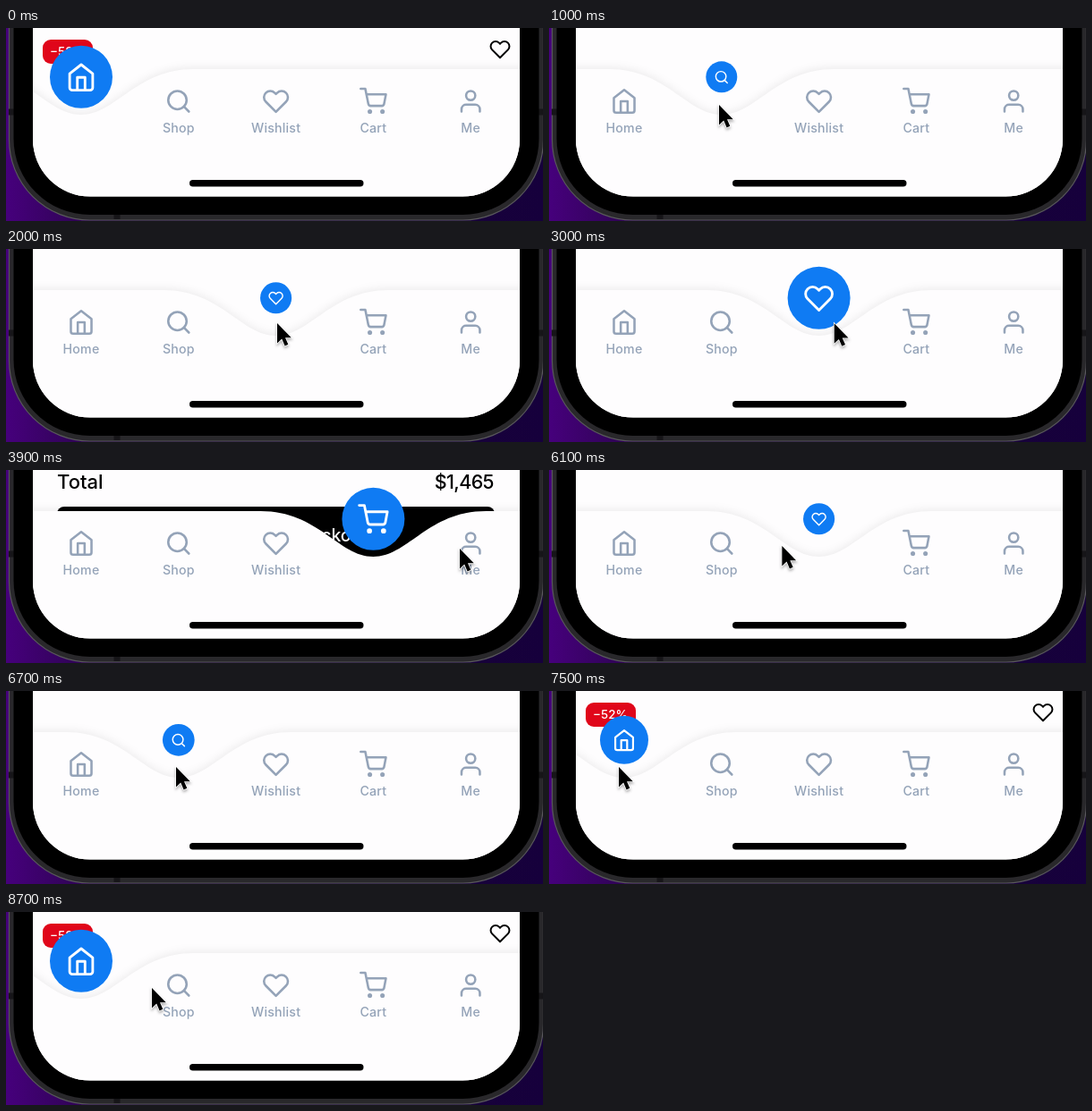
Write an HTML page that moves like this. It is 600x216 px and loops after 8.8 s.

```html
<!DOCTYPE html>
<html lang="en">
<head>
<meta charset="utf-8">
<title>Curved tab bar</title>
<style>
html, body { margin: 0; width: 100%; height: 100%; overflow: hidden; background: #000; }
svg { display: block; font-family: Inter, "Open Sans", sans-serif; font-weight: 500; }
.icon { fill: none; stroke: #94a3b8; stroke-width: 2; stroke-linecap: round; stroke-linejoin: round; }
.label { fill: #94a3b8; font-size: 14.2px; letter-spacing: .2px; text-anchor: middle; }
#bar { fill: #fefdfe; filter: drop-shadow(0 -2px 5px rgba(0, 0, 0, .07)); }
#cursor { filter: drop-shadow(0 2px 1.5px rgba(0, 0, 0, .3)); }
</style>
</head>
<body>
<svg width="600" height="216" viewBox="0 0 600 216">
  <defs>
    <linearGradient id="wall">
      <stop offset="0" stop-color="#46007c"/>
      <stop offset=".25" stop-color="#1d0636"/>
      <stop offset="1" stop-color="#16003c"/>
    </linearGradient>
    <clipPath id="screen"><rect x="30" y="-200" width="544" height="388.5" rx="64"/></clipPath>
    <g id="home"><path d="M3 9l9-7 9 7v11a2 2 0 0 1-2 2H5a2 2 0 0 1-2-2zM9 22V12h6v10"/></g>
    <g id="shop"><circle cx="11" cy="11" r="8"/><path d="M21 21l-4.35-4.35"/></g>
    <g id="wishlist"><path d="M20.84 4.61a5.5 5.5 0 0 0-7.78 0L12 5.67l-1.06-1.06a5.5 5.5 0 0 0-7.78 7.78L12 21.23l8.84-8.84a5.5 5.5 0 0 0 0-7.78z"/></g>
    <g id="cart"><circle cx="9" cy="21" r="1"/><circle cx="20" cy="21" r="1"/><path d="M1 1h4l2.68 13.39a2 2 0 0 0 2 1.61h9.72a2 2 0 0 0 2-1.61L23 6H6"/></g>
    <g id="me"><path d="M20 21v-2a4 4 0 0 0-4-4H8a4 4 0 0 0-4 4v2"/><circle cx="12" cy="7" r="4"/></g>
  </defs>

  <rect width="600" height="216" fill="url(#wall)"/>
  <rect x="3.5" y="-200" width="597" height="415" rx="90" fill="#29282b" stroke="#59585c" stroke-width="1.2"/>
  <path d="M3 94h6M595 94h5M124 208v6" stroke="#161518" stroke-width="7"/>
  <rect x="8.5" y="-200" width="587" height="409" rx="85"/>

  <g clip-path="url(#screen)">
    <rect x="30" width="544" height="190" fill="#fefdfe"/>
    <g id="homePage">
      <rect x="41" y="13" width="56" height="27" rx="9" fill="#e0061a"/>
      <text x="68.5" y="31" fill="#fff" font-size="13.5" text-anchor="middle">−52%</text>
      <use href="#wishlist" class="icon" style="stroke:#000" transform="translate(540 12)"/>
    </g>
    <g id="cartPage">
      <text x="57" y="21" font-size="22">Total</text>
      <text x="545" y="21" font-size="21.5" letter-spacing="-.6" text-anchor="end">$1,465</text>
      <rect x="57" y="41" width="489" height="70" rx="8"/>
      <text x="404" y="80" font-size="19.5" fill="#fff" text-anchor="end">Proceed to Checkout</text>
    </g>
    <path id="bar"/>
    <g id="tabs"></g>
    <g id="bubble">
      <circle r="35" fill="#0f7bf3"/>
      <use id="active" class="icon" style="stroke:#fff" transform="translate(0 .5) scale(1.43) translate(-12 -12)"/>
    </g>
    <rect x="205" y="170" width="194.5" height="7.5" rx="3.75"/>
  </g>
  <path id="cursor" d="M0 0V22.5L5.2 17.6 8.6 25.4 12.3 23.8 9 16.2H15.8Z" stroke="#fff" stroke-width="1.5" paint-order="stroke"/>
</svg>
<script>
const LOOP = 8800, GROW = 500;
const names = ['Home', 'Shop', 'Wishlist', 'Cart', 'Me'];
const tabX = i => 84 + 108.8 * i;
const el = id => document.getElementById(id);

// [time, tab]
const taps = [[-GROW, 0], [1000, 1], [1980, 2], [3150, 3], [4000, 4], [5085, 3], [6080, 2], [6650, 1], [7240, 0]];
// [time, x, y] of the pointer tip
const moves = [
  [200, 175, 225], [800, 190, 86], [1300, 190, 86], [1800, 303, 83], [2950, 303, 83],
  [3150, 400, 85], [3500, 400, 85], [3880, 507, 88], [4700, 507, 88], [5050, 400, 85],
  [5600, 400, 85], [5800, 290, 85], [6000, 290, 85], [6280, 190, 85], [6750, 190, 85],
  [7150, 78, 85], [7700, 78, 85], [8600, 163, 85], [LOOP, 163, 85]
];

el('tabs').innerHTML = names.map((name, i) => `<g>
  <use href="#${name.toLowerCase()}" class="icon" transform="translate(${tabX(i)} 82) scale(1.28) translate(-12 -12)"/>
  <text class="label" x="${tabX(i)}" y="117">${name}</text></g>`).join('');
const tabs = [...el('tabs').children];

const ease = p => p < .5 ? 2 * p * p : 1 - 2 * (1 - p) ** 2;
const show = (node, on) => node.setAttribute('visibility', on ? 'visible' : 'hidden');

function barPath(x) {
  return `M-300 46H${x - 126}C${x - 61} 46 ${x - 39} 97 ${x} 97S${x + 61} 46 ${x + 126} 46H900V300H-300Z`;
}

function drawCursor(t) {
  show(el('cursor'), t >= moves[0][0]);
  const next = moves.findIndex(m => m[0] > t);
  if (next < 1) return;
  const [t0, x0, y0] = moves[next - 1], [t1, x1, y1] = moves[next];
  const p = (t - t0) / (t1 - t0), k = p * p * (3 - 2 * p);
  el('cursor').setAttribute('transform', `translate(${x0 + (x1 - x0) * k} ${y0 + (y1 - y0) * k})`);
}

function draw(t) {
  const [start, tab] = taps.filter(tap => tap[0] <= t).pop();
  const x = tabX(tab), scale = .5 + .5 * ease(Math.min(1, (t - start) / GROW));
  tabs.forEach((node, i) => show(node, i !== tab));
  show(el('homePage'), tab === 0);
  show(el('cartPage'), tab === 3);
  el('bar').setAttribute('d', barPath(x));
  el('active').setAttribute('href', '#' + names[tab].toLowerCase());
  el('bubble').setAttribute('transform', `translate(${x} 54.8) scale(${scale})`);
  drawCursor(t);
}

const begin = performance.now();
function frame() {
  draw((performance.now() - begin) % LOOP);
  requestAnimationFrame(frame);
}
frame();
</script>
</body>
</html>
```
